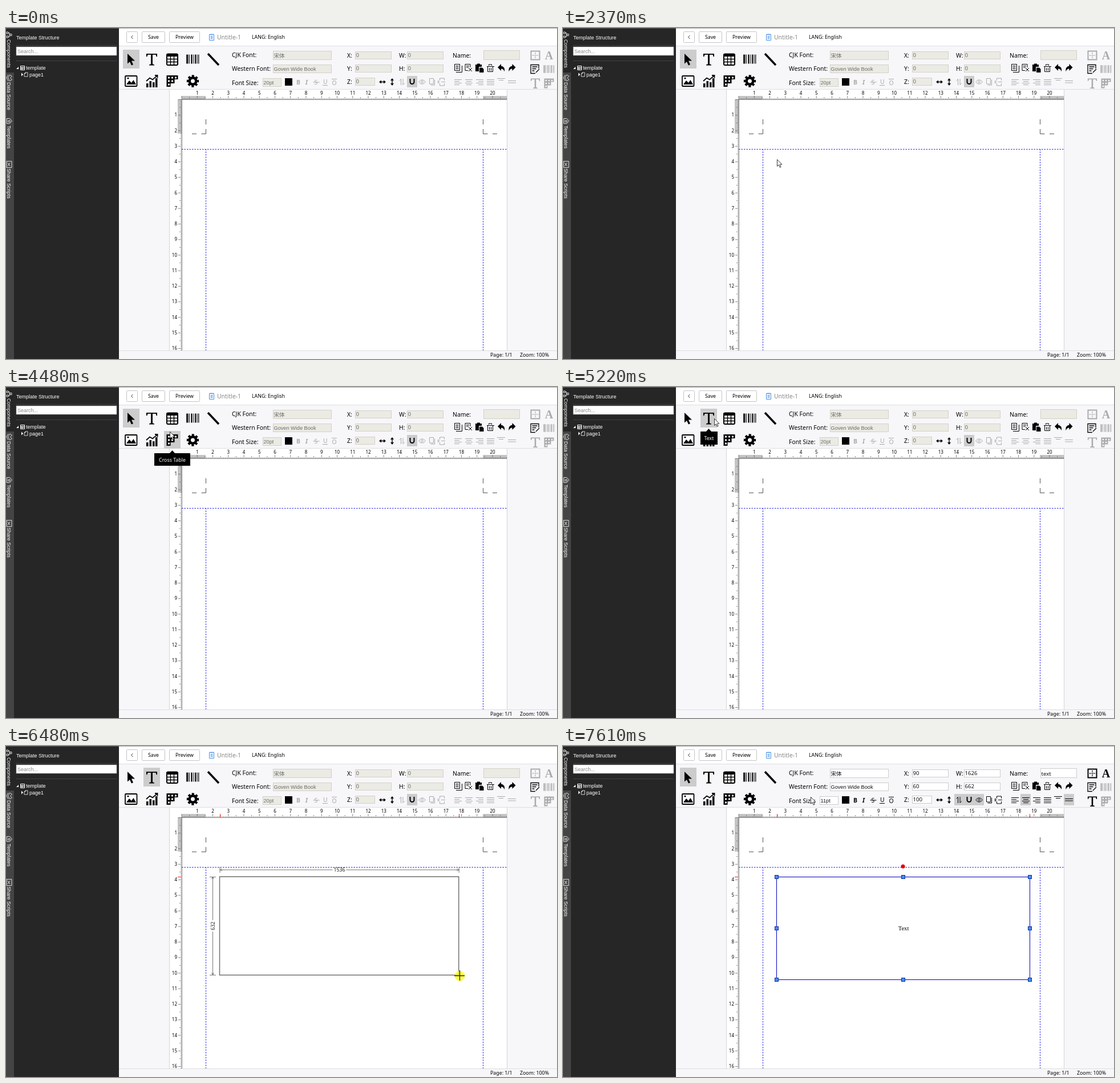
An HTML page that plays this animation: 966 px wide and 580 px high, repeating every 8000 ms.

```html
<!DOCTYPE html>
<html lang="en">
<head>
<meta charset="utf-8">
<title>Template editor</title>
<style>
html, body { margin: 0; width: 100%; height: 100%; overflow: hidden; background: #f7f6f9; }
svg { display: block; width: 966px; height: 580px; }
text { font-family: "Noto Sans", "Noto Sans CJK SC", sans-serif; font-size: 8.8px; }
.arial text, text.arial { font-family: "Liberation Sans", Arial, sans-serif; font-size: 9px; }
.label text { font-size: 10.4px; }
.ruler text { font-size: 8px; }
.mid { text-anchor: middle; }
.end { text-anchor: end; }
.line { fill: none; stroke: currentColor; }
.dis { color: #aaa; }
.made .dis { color: #000; }
.dis, .ink { fill: currentColor; }
.field rect { fill: #ebebe4; stroke: #d2d2c8; }
.field text { font-size: 9.6px; fill: #6c6c6c; }
.field text.arial { font-size: 9.2px; }
.made .field rect { fill: #fff; stroke: #ccc; }
.made .field text { fill: #111; }
.on, .made .off { display: none; }
.made .on { display: inline; }
.btn { fill: none; }
.btn.sel { fill: #ccc; }
.btn.down { fill: #aaa; }
.tip text { fill: #fff; text-anchor: middle; }
.mark { stroke: #f22; }
</style>
</head>
<body>
<svg id="stage" viewBox="0 0 966 580" xmlns="http://www.w3.org/2000/svg">
<defs>
  <path id="letterT" d="M-9.500-10H9.500V-4.800H8.200L7-8.200H1.500V8.200L4.500 9.200V10.500H-4.500V9.200L-1.500 8.200V-8.200H-7L-8.200-4.800H-9.500Z"/>
  <g id="cross">
    <path d="M-10-10H10V-3H4V4H-3V10H-10Z"/>
    <path d="M-7.5-7.5h3v3h-3zM-1.5-7.5h3v3h-3zM4.5-7.5h3v3h-3zM-7.5-1.5h3v3h-3zM-1.5-1.5h3v3h-3zM-7.5 4.5h3v3h-3z" fill="#f7f6f9"/>
  </g>
  <g id="bars">
    <path d="M-9-8V8M-2-8V8M5-8V8" class="line" stroke-width="2.200"/>
    <path d="M-11-8V8M-6-8V8M1.5-8V8M8.5-8V8M10.5-8V8" class="line" stroke-width="1"/>
  </g>
</defs>

<!-- left panel -->
<rect width="198" height="580" fill="#262626"/>
<rect y="78" width="14" height="502" fill="#444"/>
<path d="M18 30.5H194M18 57.5H194" stroke="#505050" stroke-dasharray="2 1"/>
<rect x="18" y="33" width="176" height="15" fill="#fff" stroke="#999" stroke-width=".6"/>
<g class="arial" fill="#fff">
  <text x="18" y="20">Template Structure</text>
  <text x="20" y="44" fill="#888">Search...</text>
  <text x="35" y="73">template</text>
  <text x="41" y="85">page1</text>
  <g id="tabs"></g>
  <path d="M18 72h4v-4zM27 78.500v6l3-3z"/>
  <path d="M25.500 66.500h7v7h-7zM25.500 69h7M25.500 71h7M28 69v4" fill="none" stroke="#fff"/>
  <path d="M34 78h4v7h-6v-5zM32 80h2v-2" fill="none" stroke="#fff" stroke-width=".8"/>
  <g fill="none" stroke="#ddd">
    <path d="M1 7h3v3H1zM1 14h3v3H1zM7 10.500h3v3H7zM4 8.500h2v7H4M6 12h1"/>
    <path d="M4 82L1 87l3 6M6.500 82l-3 5 3 6M6.500 82l4 2.500-3 3 3 3-4 2.500"/>
    <path d="M1.500 158.500h5l4 4.500-4 4.500h-5zM4 162h3v3H4z"/>
    <path d="M1 233.500h9v11H1zM3 236l4 6M7 236l-4 6"/>
  </g>
</g>

<!-- bars and page -->
<rect x="198" width="768" height="580" fill="#f7f6f9"/>
<rect x="198" width="768" height="31" fill="#fff"/>
<path d="M198 31.500H966M198 107.500H966M198 565.500H966" stroke="#dedee2"/>
<path d="M0 .5H966" stroke="#aaa"/>
<path d="M0 .5H198" stroke="#555"/>
<rect x="286.500" y="108" width="592" height="457" fill="#fff"/>
<path d="M286.500 108V565M878.500 108V565" stroke="#d4d4d8"/>
<g fill="#c4c4c4">
  <rect x="308" y="119" width="42" height="6"/><rect x="836" y="119" width="42" height="6"/>
  <rect x="301" y="125" width="7" height="60"/>
</g>
<g id="ruler" class="ruler" fill="#000"></g>
<path d="M350.500 160v9M350.500 177v8.500h-8M326 185.500h8M836.500 160v9M836.500 177v8.500h8M853 185.500h8" fill="none" stroke="#555"/>
<path d="M308 212.500H878M350.500 212V565M836.500 212V565" fill="none" stroke="#2222ee" stroke-dasharray="2.500 2"/>

<!-- title bar -->
<g fill="#fff" stroke="#c4c4c8">
  <rect x="211.500" y="6.500" width="19" height="19" rx="1"/>
  <rect x="238.500" y="6.500" width="40" height="19" rx="1"/>
  <rect x="286.500" y="6.500" width="53" height="19" rx="1"/>
</g>
<path d="M222.500 13l-3 3 3 3" fill="none" stroke="#333"/>
<text x="258.500" y="19" class="mid">Save</text>
<text x="313" y="19" class="mid">Preview</text>
<path d="M356.500 11.500h8v10h-8zM358.500 14.500h4M358.500 16.500h4M358.500 18.500h4M358 10v2M360.500 10v2M363 10v2" fill="none" stroke="#4a90e2"/>
<g class="label"><text x="370" y="20" fill="#888">Untitle-1</text></g>
<text x="431" y="19">LANG: English</text>
<text x="849" y="576">Page: 1/1</text>
<text x="901" y="576">Zoom: 100%</text>

<!-- tool buttons -->
<rect id="pick" class="btn" x="205" y="38" width="29" height="33"/>
<rect id="textBtn" class="btn" x="241" y="38" width="29" height="33"/>
<rect id="crossBtn" class="btn" x="277" y="77" width="29" height="31"/>
<path d="M213 45V62.500L217 59l3 6.500 3-1.500-3-6.500H226z"/>
<use href="#letterT" x="255.500" y="55"/>
<rect x="282" y="45.500" width="19" height="19.500" rx="2" fill="#fff" stroke="#000" stroke-width="2"/>
<path d="M281 48H302" stroke="#000" stroke-width="4"/>
<path d="M282 54.500h19M282 59.500h19M288.500 48v17M294.500 48v17" stroke="#000" stroke-width="1.500"/>
<use href="#bars" x="327.500" y="54.500"/>
<path d="M354 45L373 65" stroke="#000" stroke-width="3.500"/>
<rect x="209" y="84" width="20.500" height="18" rx="1" fill="#fff" stroke="#000" stroke-width="1.800"/>
<path d="M211 99l5-7 4 4 3.500-5 4.500 8z"/><circle cx="214" cy="88" r="1.600"/>
<path d="M246 97h3.500v7H246zM251.500 93h3.500v11h-3.500zM257 95h3.500v9H257zM262 88h3.500v16H262z"/>
<path d="M246 93l6-5.500 5 3 8-7M261 83h4.500v4.500" fill="none" stroke="#000" stroke-width="1.800"/>
<use href="#cross" x="291.500" y="93"/>
<circle cx="327.500" cy="93" r="5.800" fill="none" stroke="#000" stroke-width="4.600"/>
<circle cx="327.500" cy="93" r="9" fill="none" stroke="#000" stroke-width="3.400" stroke-dasharray="4 3.069" transform="rotate(-12.700 327.500 93)"/>

<!-- properties -->
<g class="label">
  <text x="396" y="51">CJK Font:</text><text x="396" y="75">Western Font:</text><text x="396" y="100">Font Size:</text>
  <text x="598" y="52">X:</text><text x="598" y="75">Y:</text><text x="598" y="98">Z:</text>
  <text x="689" y="52">W:</text><text x="689" y="75">H:</text><text x="783" y="52">Name:</text>
</g>
<g id="fields"></g>
<rect x="489" y="88" width="13" height="13"/>
<g class="dis label">
  <text x="509" y="99" font-weight="bold">B</text>
  <text x="525" y="99" font-weight="bold" font-style="italic">I</text>
  <text x="540.500" y="99">S</text><text x="556" y="98">U</text><text x="571.500" y="100">O</text>
  <path class="line" d="M538.500 95h11M555 100.500h9M571 89.500h9"/>
</g>
<rect x="703" y="84" width="18" height="20" fill="#ccc"/>
<path class="on" d="M686 84h52v20h-52zM802 84h18v20h-18zM878 84h18v20h-18z" fill="#ccc"/>
<path d="M654 94.500l4-3v2.300h4V91.500l4 3-4 3v-2.300h-4v2.300zM677 88l3 4h-2.300v5H680l-3 4-3-4h2.300v-5H674z"/>
<path class="line dis" d="M692.500 100V89.500l-3 3M696 89v10.500l3-3" style="fill:none"/>
<path d="M708.500 89v5.500a3.500 3.500 0 0 0 7 0V89" fill="none" stroke="#000" stroke-width="2"/>
<g class="dis"><g class="line">
  <path d="M723.500 94.500q6-7.500 12 0q-6 7.500-12 0z"/><circle cx="729.500" cy="94.500" r="1.800"/>
  <path d="M742.500 88.500h7v9.500h-7zM744.500 100h7V90.500"/>
  <path d="M760.500 92v-4h8v4M760.500 97v4h8v-4M763 94.500h7M757.500 92l2.500 2.500-2.500 2.500z"/>
</g></g>
<g class="line">
  <path d="M786.500 63.500h9v11h-9zM789 77.500h10.500V66M788.500 66.500h5M788.500 69h5M788.500 71.500h5"/>
  <path d="M814 69v-5.500h-9v11h5M807 66.500h5M807 69h4M811 70l6 6M817 70l-6 6"/>
  <path d="M843 68.500h13M846.500 67v-2h5v2M844.500 69v8.500h9V69M847.500 71v5M850.500 71v5" transform="translate(0 -1)"/>
</g>
<path d="M823 64h3v-1.500h5V64h3v4h-5v8h-6zM830 69.500h5l2.500 2.500v6H830z"/>
<path d="M862 69l6-6v3.500q7 1 6 10q-2-5.500-6-5V75zM893.500 69l-6-6v3.500q-7 1-6 10q2-5.500 6-5V75z"/>
<path class="dis line" d="M786 90.500h13M786 93.500h9M786 96.500h13M786 99.500h9M805 90.500h13M807 93.500h9M805 96.500h13M807 99.500h9M824 90.500h13M828 93.500h9M824 96.500h13M828 99.500h9M843 90.500h13M843 93.500h13M843 96.500h13M843 99.500h13M861 88.500h14M864 91.500h8M880 92.500h14M880 96h14"/>
<g class="dis">
  <path class="line" d="M920.500 40.500h15v15h-15z" stroke-width="2"/>
  <path class="line" d="M923 48h11M928 43v11" stroke-dasharray="2 1.500" stroke-width="1.500"/>
  <text x="952" y="54.500" class="mid" style="font:bold 20px 'Liberation Serif',serif">A</text>
  <use href="#letterT" transform="translate(928 97) scale(.85)"/>
</g>
<path class="line" d="M934 71v-6.500h-14v15h8M922.500 68h9M922.500 71.500h7M922.500 75h4M929 78l6-6" stroke-width="1.300"/>
<g color="#aaa" fill="#aaa">
  <use href="#bars" transform="translate(952 72) scale(.85)"/>
  <use href="#cross" transform="translate(952 97) scale(.85)"/>
</g>

<!-- drawing layer -->
<g id="marks" class="mark"><path id="markStart" d="M375.500 119v6M301 229.500h6"/><path id="markEnd"/></g>
<rect id="lasso" x="374.500" y="229.500" fill="none" stroke="#888" stroke-dasharray="6.500 4"/>
<g id="draft" fill="none" stroke="#777">
  <rect id="draftBox" x="374.500" y="229" stroke-width="1.600"/>
  <path id="dims"/>
  <g stroke="none" class="mid"><rect id="gapW" y="213" width="24" height="9" fill="#fff"/><rect id="gapH" x="358" width="9" height="20" fill="#fff"/>
  <text id="numW" y="220" fill="#222"></text><text id="numH" fill="#222"></text></g>
</g>
<g class="on">
  <rect x="374.500" y="229.500" width="444" height="180" fill="none" stroke="#0000c0"/>
  <g id="handles" fill="#4a8de8" stroke="#0a2aa0"></g>
  <circle cx="596" cy="211" r="3.500" fill="#e00000"/>
  <text x="597" y="323" class="mid" style="font:10.600px 'Liberation Serif',serif">Text</text>
</g>

<g id="tipText" class="tip"><path d="M241 78h10l4.500-5 4.500 5h11v23h-30z"/><text x="256" y="92.500">Text</text></g>
<g id="tipCross" class="tip"><path d="M260 116h27l4.500-5 4.500 5h27v22h-63z"/><text x="291.500" y="130.500">Cross Table</text></g>

<g id="cursor">
  <circle id="halo" cx=".5" cy="1" r="9" fill="#ff0" opacity=".7"/>
  <path id="arrow" d="M.5 .5V12.300L3.200 9.800 5.200 14.300 7.100 13.500 5.100 9.100H8.900Z" fill="#fff" stroke="#222" stroke-width=".9"/>
  <path id="plus" d="M-9 .5H9M.5-9V9" stroke="#222" stroke-width="1.300"/>
</g>
</svg>

<script>
const $ = id => document.getElementById(id);
const show = (id, on) => $(id).style.display = on ? 'inline' : 'none';
const set = (id, attrs) => { for (const k in attrs) $(id).setAttribute(k, attrs[k]); };
const within = (n, a, b) => n >= a && n <= b;

const LOOP = 8000, TICK = 124.5;
const LEFT = 375, TOP = 229, UNITS = 3.666;

// pointer path: tick, x, y
const path = [
  [2, 441, 291], [3, 372, 234], [4, 372, 234], [7, 325, 140], [10, 266, 50], [11, 266, 49], [12, 266, 49],
  [16, 330, 165], [18, 376, 244], [19, 375, 230], [20, 395, 241], [24, 651, 392], [25, 681, 404],
  [29, 757, 424], [31, 757, 424], [34, 400, 165], [36, 287, 78], [38, 265, 56], [39, 265, 55], [42, 265, 55],
  [44, 362, 211], [45, 373, 233], [46, 375, 230], [47, 375, 230], [50, 690, 358], [52, 795, 402],
  [54, 818, 410], [55, 815, 401], [56, 815, 401], [59, 560, 200], [61, 434, 89]
];

function pointer(n) {
  const i = path.findIndex(p => p[0] >= n);
  if (i < 0) return path[path.length - 1].slice(1);
  if (i === 0) return path[0].slice(1);
  const [a, x, y] = path[i - 1], [b, u, v] = path[i], f = (n - a) / (b - a);
  return [Math.round(x + (u - x) * f), Math.round(y + (v - y) * f)];
}

function buildTabs() {
  const tabs = { Components: 20, 'Data Source': 95, Templates: 171, 'Share Scripts': 246 };
  $('tabs').innerHTML = Object.entries(tabs).map(([name, y]) =>
    `<text transform="translate(1.5 ${y}) rotate(90)" style="font-size:8.8px">${name}</text>`).join('');
}

function buildRuler() {
  const step = 27.25;
  let d = 'M308 125.500H878M308.500 125V565', labels = '';
  for (let i = 0; i <= 209; i++) {
    const size = i % 10 ? (i % 5 ? 2 : 4) : 6, x = 308 + i * step / 10, y = 125.5 + i * step / 10;
    d += `M${x} 125v${-size}`;
    if (y < 565) d += `M308 ${y}h${-size}`;
    if (i && i % 10 === 0) {
      labels += `<text x="${x}" y="117" class="mid">${i / 10}</text>`;
      if (y < 565) labels += `<text x="300" y="${y + 2.5}" class="end">${i / 10}</text>`;
    }
  }
  $('ruler').innerHTML = `<path d="${d}" fill="none" stroke="#555" stroke-width=".7"/>` + labels;
}

function buildFields() {
  const field = (x, y, w, h, off, on, cls = '') =>
    `<g class="field"><rect x="${x + .5}" y="${y + .5}" width="${w - 1}" height="${h - 1}"/>` +
    `<text class="off ${cls}" x="${x + 1.5}" y="${y + h - 4}">${off}</text>` +
    `<g class="on"><text class="${cls}" x="${x + 1.5}" y="${y + h - 4}">${on}</text></g></g>`;
  $('fields').innerHTML =
    field(468, 40, 103, 16, '宋体', '宋体') +
    field(468, 64, 103, 15, 'Goven Wide Book', 'Goven Wide Book', 'arial') +
    field(450, 88, 33, 15, '20pt', '11pt', 'arial') +
    field(612, 41, 64, 14, '0', '90') + field(612, 64, 64, 14, '0', '60') + field(612, 87, 35, 14, '0', '100') +
    field(703, 41, 64, 14, '0', '1626') + field(703, 64, 64, 14, '0', '662') + field(837, 39, 64, 17, '', 'text');
}

function buildHandles() {
  let out = '';
  for (const x of [374.5, 596.5, 818.5]) for (const y of [229, 319, 409])
    if (x !== 596.5 || y !== 319) out += `<rect x="${x - 3}" y="${y - 2.5}" width="6" height="6"/>`;
  $('handles').innerHTML = out;
}

function drawDraft(x, y) {
  const r = x - .8, b = y - .6, w = Math.max(1, r - LEFT), h = Math.max(1, b - TOP);
  const cx = LEFT + w / 2, cy = TOP + h / 2;
  set('draftBox', { width: w, height: h });
  set('dims', { d: `M${LEFT} 217H${r}M${LEFT} 212v10M${r} 212v10M${LEFT + 4} 215l-4 2 4 2M${r - 4} 215l4 2-4 2` +
    `M362.5 ${TOP}V${b}M357 ${TOP + .5}h11M357 ${b}h11M360.5 ${TOP + 4}l2-4 2 4M360.5 ${b - 4}l2 4 2-4` });
  set('gapW', { x: cx - 12 });
  set('gapH', { y: cy - 10 });
  set('numW', { x: cx });
  set('numH', { transform: `translate(366 ${cy}) rotate(-90)` });
  $('numW').textContent = Math.round(w * UNITS / 2) * 2;
  $('numH').textContent = Math.round(h * UNITS / 2) * 2;
}

function render(time) {
  const n = Math.floor((time + 10) / TICK), [x, y] = pointer(n);
  const made = n >= 55, lasso = within(n, 20, 31), draft = within(n, 48, 54);
  const tool = within(n, 42, 54), click = within(n, 11, 12) || n === 39;
  const hover = within(n, 10, 12) || within(n, 38, 42);

  $('stage').classList.toggle('made', made);
  $('pick').classList.toggle('sel', !tool);
  $('textBtn').classList.toggle('sel', tool || hover);
  $('textBtn').classList.toggle('down', click);
  $('crossBtn').classList.toggle('sel', n === 36);
  show('tipText', hover);
  show('tipCross', n === 36);

  show('lasso', lasso);
  if (lasso) set('lasso', { width: x - 3 - LEFT, height: y - TOP - 1 });
  show('draft', draft);
  if (draft) drawDraft(x, y);
  show('marks', lasso || draft || made);
  const mx = made ? 818.5 : lasso ? x - 3.5 : x - .5;
  set('markEnd', { d: `M${mx} 119v6` + (lasso ? `M301 ${y + .5}h6` : '') });

  const plus = within(n, 45, 54);
  show('cursor', n >= 2);
  show('halo', click || lasso || within(n, 46, 54));
  show('arrow', !plus);
  show('plus', plus);
  set('cursor', { transform: `translate(${x} ${y})` });
}

buildTabs();
buildRuler();
buildFields();
buildHandles();
const start = performance.now();
function loop() {
  render((performance.now() - start) % LOOP);
  requestAnimationFrame(loop);
}
loop();
</script>
</body>
</html>
```
